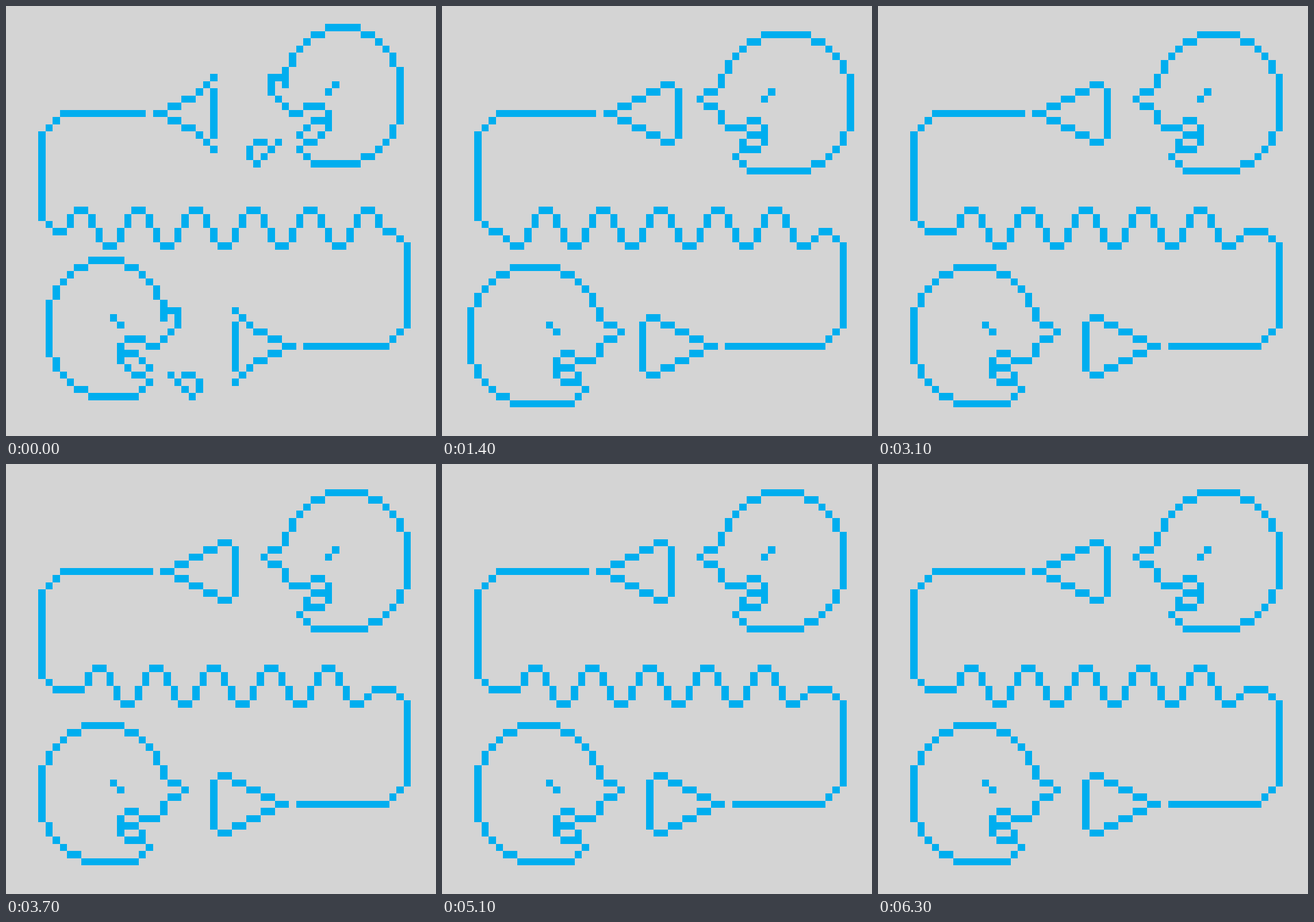
Recreate the animation shown at these times as an HTML page with a canvas. Size 748 by 748 pixels, loop 6400 ms.

```html
<!DOCTYPE html>
<html lang="en">
<head>
<meta charset="utf-8">
<title>Heads and horns</title>
<style>
  html, body { margin: 0; width: 100%; height: 100%; overflow: hidden; background: #d4d4d4; }
  canvas { display: block; }
</style>
</head>
<body>
<canvas id="stage" width="748" height="748"></canvas>
<script>
const ctx = document.getElementById('stage').getContext('2d');
const CELL = 748 / 60;
const STEP = 100;
const DROP = 32.5; // rows between the upper and the lower figure

let lower = false;

const edge = n => Math.round((n + 0.5) * CELL);

function box(x, y, w, h) {
  const left = edge(x), top = edge(y);
  ctx.fillRect(left, top, edge(x + w) - left, edge(y + h) - top);
}

// The lower figure is the upper one mirrored and moved down.
function put(x, y, w, h) {
  if (lower) box(60 - x - w, y + DROP, w, h);
  else box(x, y, w, h);
}
const row = (x, y, n = 1) => put(x, y, n, 1);
const col = (x, y, n = 1) => put(x, y, 1, n);

function skull(grow, y) {
  row(44, y, 5 + grow);
  row(42, y + 1, 2);
  row(41, y + 2);
  row(40, y + 3);
  col(39, y + 4, 2);
  for (const flip of [false, true]) {
    const at = (dy, n) => flip ? y + 20 - dy - n : y + dy;
    row(49 + grow, at(1, 1), 2);
    row(51 + grow, at(2, 1));
    row(52 + grow, at(3, 1));
    col(53 + grow, at(4, 2), 2);
  }
  col(54 + grow, y + 6, 8);
  row(42, y + 19, 7 + grow);
  row(41, y + 18);
  row(40, y + 17);
  row(45, y + 8);
  row(44, y + 9);
}

function openFace() {
  // nose
  col(38, 8, 3);
  row(37, 9);
  col(36, 9, 3);
  row(37, 12);
  row(38, 13);
  // mouth
  row(39, 14, 2);
  row(41, 13, 3);
  col(44, 14, 3);
  row(42, 15, 2);
  row(41, 16);
  row(40, 17);
  row(43, 17);
  row(41, 18, 2);
  // breath
  row(34, 18, 2);
  col(33, 19, 2);
  row(34, 21);
  row(35, 20);
  row(36, 19);
  row(37, 18);
}

function shutFace() {
  // nose
  col(38, 9, 2);
  row(36, 11, 2);
  row(35, 12);
  row(36, 13, 2);
  col(38, 14, 2);
  // mouth
  row(39, 16, 3);
  row(42, 15, 2);
  col(44, 16, 3);
  row(42, 17, 2);
  row(41, 18);
  row(41, 19, 3);
}

// Each entry of steps is the width of one stair away from the axis.
function horn(tip, steps, front) {
  row(tip, 14, 2);
  let x = tip + 2;
  steps.forEach((n, i) => {
    row(x, 13 - i, n);
    row(x, 15 + i, n);
    x += n;
  });
  col(front, 11, 7);
  row(7, 14, tip - 8);
}

function cable() {
  if (lower) {
    row(6, 13);
    row(5, 12);
    col(4, 0, 12);
    row(5, -1);
  } else {
    row(6, 15);
    row(5, 16);
    col(4, 17, 12.5);
    row(5, 29.5);
  }
}

function wave(first, last, phase) {
  box(6, 30.5, first - 6, 1);
  box(last + 1, 30.5, 53 - last, 1);
  for (let x = first; x <= last; x++) {
    const k = (x - phase + 8) % 8;
    const end = x === first || x === last;
    if (k === 1 || k === 2) box(x, 27.5, 1, 1);
    else if (k === 5 || k === 6) box(x, 32.5, 1, 1);
    else if (k === 0 || k === 3) box(x, 28.5, 1, 2);
    else if (end) box(x, 31.5, 1, 1);
    else box(x, 30.5, 1, 2);
  }
}

const out = { grow: 0, y: 2, face: openFace, horn: [20, [2, 2, 1, 1, 1], 28], wave: [8, 51, 8] };
const mid = { grow: 1, y: 3, face: shutFace, horn: [21, [2, 2, 2, 2], 31], wave: [10.5, 49.5, 10.5] };
const full = { grow: 2, y: 3, face: shutFace, horn: [22, [2, 2, 2, 2], 32], wave: [8, 51, 12] };
const cycle = [out, mid, full, mid];

function draw(pose) {
  ctx.fillStyle = '#d4d4d4';
  ctx.fillRect(0, 0, 748, 748);
  ctx.fillStyle = '#00aeef';
  for (lower of [false, true]) {
    skull(pose.grow, pose.y);
    pose.face();
    horn(...pose.horn);
    cable();
  }
  wave(...pose.wave);
}

const start = performance.now();
function tick() {
  const t = performance.now() - start;
  draw(cycle[Math.floor(t / STEP) % cycle.length]);
  requestAnimationFrame(tick);
}
tick();
</script>
</body>
</html>
```
